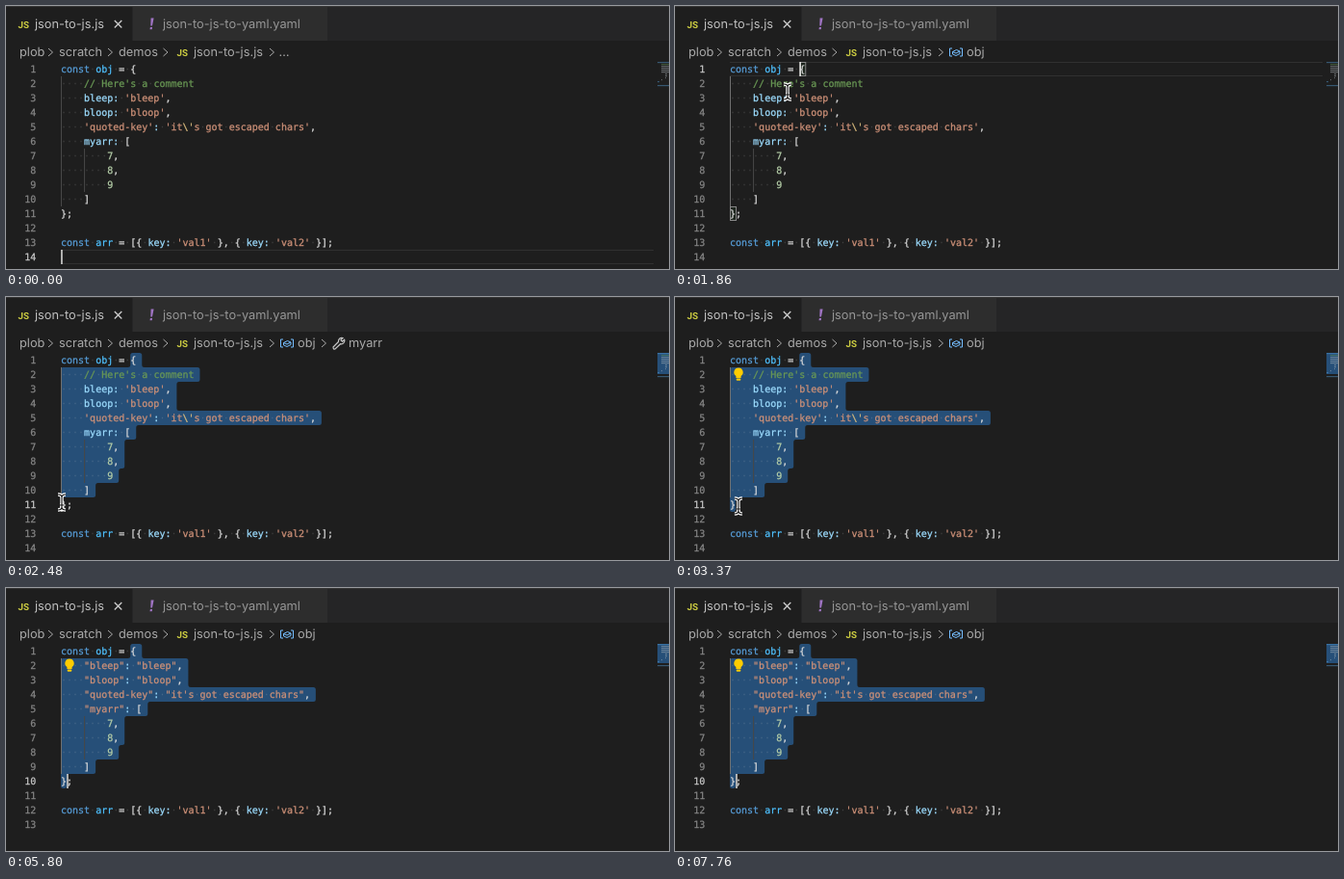
These frames come from a looping animation (689 by 273 pixels, 8 s). An HTML page:

```html
<!DOCTYPE html>
<html lang="en">
<head>
<meta charset="utf-8">
<title>Editor demo</title>
<style>
  html, body { margin: 0; width: 100%; height: 100%; overflow: hidden; background: #1e1e1e; }
  svg { display: block; }
  text { text-rendering: geometricPrecision; }
  .ui { font: 12.8px Inter, sans-serif; fill: #a9a9a9; }
  .js { font: 700 9.8px Roboto, sans-serif; fill: #cbcb41; }
  .code { font: 10px "DejaVu Sans Mono", monospace; color: #dcdcdc; }
  .code, .code tspan { fill: currentColor; stroke: currentColor; stroke-width: .25; }
  .num { color: #858585; text-anchor: end; }
  .on { color: #c6c6c6; }
  .comment { color: #6a9955; }
  .string { color: #ce9178; }
  .escape { color: #d7ba7d; }
  .word { color: #569cd6; }
  .key { color: #9cdcfe; }
  .digit { color: #b5cea8; }
  .name { color: #4fc1ff; }
  .code .dot { color: #e3e4e22b; stroke: none; }
  .line { fill: none; stroke: #a9a9a9; }
</style>
</head>
<body>
<svg width="689" height="273" viewBox="0 0 689 273">
  <defs>
    <path id="beam" fill="none" d="M-4-8Q0-8 0-5V5Q0 8-4 8M4-8Q0-8 0-5M0 5Q0 8 4 8M-2 3H2"/>
  </defs>
  <rect width="689" height="273" fill="#1e1e1e"/>
  <rect x="131" width="558" height="36" fill="#252526"/>
  <rect x="132" width="202" height="36" fill="#2d2d2d"/>
  <rect width="689" height="1" fill="#343434"/>
  <text class="js" x="12.5" y="22.8">JS</text>
  <text class="ui" x="30" y="23.3" style="fill:#c0c0c0">json-to-js.js</text>
  <path class="line" d="M112.800 15l7.500 7.500M120.300 15l-7.500 7.500" style="stroke:#ccc;stroke-width:1.3"/>
  <path d="M150.600 12.500h3l-1.600 8h-1.700zM149.900 22h2.200l-.4 2.300h-2.200z" fill="#a074c4"/>
  <text class="ui" x="163" y="23.3" style="fill:#969696">json-to-js-to-yaml.yaml</text>

  <text class="ui" x="14" y="52">plob</text>
  <text class="ui" x="55" y="52">scratch</text>
  <text class="ui" x="117" y="52">demos</text>
  <text class="js" x="177.5" y="51.5">JS</text>
  <text class="ui" x="195" y="52">json-to-js.js</text>
  <path class="line" d="M44 44l4.500 4-4.500 4M106 44l4.500 4-4.500 4M163.500 44l4.500 4-4.500 4"/>
  <g id="crumbs"></g>
  <g id="editor"></g>
  <g id="pointer">
    <use href="#beam" stroke="#fff" stroke-width="3.4"/>
    <use href="#beam" stroke="#111" stroke-width="1.1"/>
  </g>
</svg>
<script>
const LOOP = 8000, STEP = 88.9;
const LEFT = 57, TOP = 58, CH = 6.02, ROW = 15;
const CLICK = 19, CONVERT = 54, HIDE = 40;
const $ = id => document.getElementById(id);

const before = `const obj = {
    // Here's a comment
    bleep: 'bleep',
    bloop: 'bloop',
    'quoted-key': 'it\\'s got escaped chars',
    myarr: [
        7,
        8,
        9
    ]
};

const arr = [{ key: 'val1' }, { key: 'val2' }];
`.split('\n');
const after = `const obj = {
    "bleep": "bleep",
    "bloop": "bloop",
    "quoted-key": "it's got escaped chars",
    "myarr": [
        7,
        8,
        9
    ]
};

const arr = [{ key: 'val1' }, { key: 'val2' }];
`.split('\n');

// pointer path: [step, x, y]
const path = [[3, 92, 100], [5, 106, 76], [6, 106, 76], [11, 131, 74], [14, 132, 68],
  [20, 131, 70], [21, 117, 89], [27, 58, 213], [28, 58, 213], [31, 65.9, 217]];
// steps at which the caret turns off, on, off, ...
const blinks = [3, 8, 14, 19, 35, 40, 46, 51, 59, 65, 70, 75, 81, 86];

const colX = col => LEFT + col * CH;
const rowY = row => TOP + row * ROW;
const rect = (x, y, w, h, fill, more = '') =>
  `<rect x="${x}" y="${y}" width="${w}" height="${h}" fill="${fill}" ${more}/>`;
const label = (x, text) => `<text class="ui" x="${x}" y="52">${text}</text>`;
const chevron = x => `<path class="line" d="M${x} 44l4.500 4-4.500 4"/>`;

function pointerAt(step) {
  const i = path.findIndex(p => p[0] > step);
  if (i === 0) return path[0].slice(1);
  if (i < 0) return path[path.length - 1].slice(1);
  const a = path[i - 1], b = path[i], k = (step - a[0]) / (b[0] - a[0]);
  return [a[1] + (b[1] - a[1]) * k, a[2] + (b[2] - a[2]) * k];
}

const kinds = ['comment', 'string', 'word', 'key', 'digit', 'name'];
const tokens = /(\/\/.*)|('(?:\\.|[^'])*'|"[^"]*")|(const)|(\w+(?=:)|:)|(\d)|(obj|arr)/g;
const dots = text => text.replace(/ +/g, s => `<tspan class='dot'>${'·'.repeat(s.length)}</tspan>`);

function paint(line) {
  let out = '', last = 0;
  for (const m of line.matchAll(tokens)) {
    const kind = kinds[m.slice(1).findIndex(Boolean)];
    const body = dots(m[0]).replace("\\'", `<tspan class='escape'>\\'</tspan>`);
    out += dots(line.slice(last, m.index)) + `<tspan class="${kind}">${body}</tspan>`;
    last = m.index + m[0].length;
  }
  return out + dots(line.slice(last));
}

function roundedPath(pts, radius) {
  const toward = (p, q) => {
    const len = Math.hypot(q[0] - p[0], q[1] - p[1]) || 1, k = Math.min(radius, len / 2) / len;
    return [p[0] + (q[0] - p[0]) * k, p[1] + (q[1] - p[1]) * k];
  };
  return pts.map((p, i) => {
    const prev = pts[(i + pts.length - 1) % pts.length], next = pts[(i + 1) % pts.length];
    return `${i ? 'L' : 'M'}${toward(p, prev)}Q${p} ${toward(p, next)}`;
  }).join('') + 'Z';
}

function selection(lines, row, col) {
  const start = colX(12), pts = [[start, TOP]];
  for (let i = 0; i <= row; i++) {
    if (i === row && !col) break;
    const x = colX(i < row ? lines[i].length + 1 : col);
    pts.push([x, rowY(i)], [x, rowY(i + 1)]);
  }
  pts.push([LEFT, pts[pts.length - 1][1]], [LEFT, rowY(1)], [start, rowY(1)]);
  return `<path d="${roundedPath(pts, 2.5)}" fill="#264f78"/>`;
}

function bulb() {
  return `<path d="M66 73.500a4.700 4.700 0 0 1 2.600 8.600v1.900h-5.200v-1.900a4.700 4.700 0 0 1 2.600-8.600z" fill="#fc0"/>` +
    rect(63.7, 84.6, 4.6, 2.2, '#fc0', 'rx="1"');
}

function minimap(lines, selected, row) {
  let out = selected ? rect(677, TOP, 12, 2 * (row + 1), '#264f78') : '';
  lines.forEach((line, i) => {
    const indent = line.search(/\S/);
    if (indent < 0) return;
    const x = 677 + indent, w = Math.min(12 - indent, line.length - indent);
    const fill = !indent ? '#569cd6' : line.includes('//') ? '#6a9955' : '#b0b8bc';
    if (w > 0) out += rect(x, TOP + 2 * i, w, 1.2, fill, 'opacity=".45"');
  });
  return out;
}

function crumbs(step) {
  if (step < CLICK) return chevron(274) + label(283.5, '…');
  const cube = `<path class="line" style="stroke:#75beff" d="M288 44h-2.500v8h2.500M296 44h2.500v8h-2.500
    M288.500 47.500l4-2 3.500 1.500v2.500l-4 2-3.500-1.500zl3.500 1.500 4-2"/>`;
  const wrench = `<path class="line" style="stroke:#c5c5c5;stroke-width:1.2"
    d="M340 52l5.500-5.500a3.500 3.500 0 0 1 4.500-4l-2 2.200 1.500 1.500 2.200-2a3.500 3.500 0 0 1-4.200 4.500l-5.500 5.300q-2 .5-2-2z"/>`;
  const tail = step >= 26 && step < 30 ? chevron(328) + wrench + label(356, 'myarr') : '';
  return chevron(274) + cube + label(303, 'obj') + tail;
}

function caretAt(step, lines) {
  if (step < CLICK) return [13, 0];
  if (step >= CONVERT) return [9, 1];
  const [x, y] = pointerAt(step - 1);
  const row = Math.floor((y - TOP) / ROW);
  const col = Math.round((x - LEFT) / CH);
  return [row, Math.max(0, Math.min(col, lines[row].length))];
}

function editor(step) {
  const lines = step < CONVERT ? before : after;
  const [row, col] = caretAt(step, lines);
  const selected = step >= CLICK && row > 0;
  const last = lines.indexOf('};');
  let out = '';

  if (selected) out += selection(lines, row, col);
  else for (const y of [rowY(row), rowY(row + 1) - 1]) out += rect(LEFT, y, 616, 1, '#303030');
  if (step >= CLICK && !selected)
    for (const [r, c] of [[0, 12], [last, 0]])
      out += rect(colX(c) + .5, rowY(r) + .5, CH, ROW - 1, '#1d251d', 'stroke="#888"');

  const active = row === 0 || row === last;
  out += rect(LEFT, rowY(1), 1, ROW * (last - 1), active ? '#707070' : '#484848');
  out += rect(colX(4), rowY(last - 4), 1, ROW * 3, '#484848');

  lines.forEach((line, i) => {
    const y = rowY(i) + 11;
    out += `<text class="code num ${i === row ? 'on' : ''}" x="31.4" y="${y}">${i + 1}</text>`;
    out += `<text class="code" x="${LEFT}" y="${y}">${paint(line)}</text>`;
  });

  if (blinks.filter(b => b <= step).length % 2 === 0)
    out += rect(colX(col) + .2, rowY(row), 1.5, ROW, '#e0e0de');
  if (step >= 32) out += bulb();
  return out + minimap(lines, selected, row);
}

let shown = -1;
function draw() {
  const step = Math.floor((performance.now() % LOOP + 15) / STEP);
  if (step !== shown) {
    shown = step;
    $('crumbs').innerHTML = crumbs(step);
    $('editor').innerHTML = editor(step);
    const visible = step >= path[0][0] && step < HIDE;
    $('pointer').setAttribute('visibility', visible ? 'visible' : 'hidden');
    $('pointer').setAttribute('transform', `translate(${pointerAt(step)})`);
  }
  requestAnimationFrame(draw);
}
draw();
</script>
</body>
</html>
```
